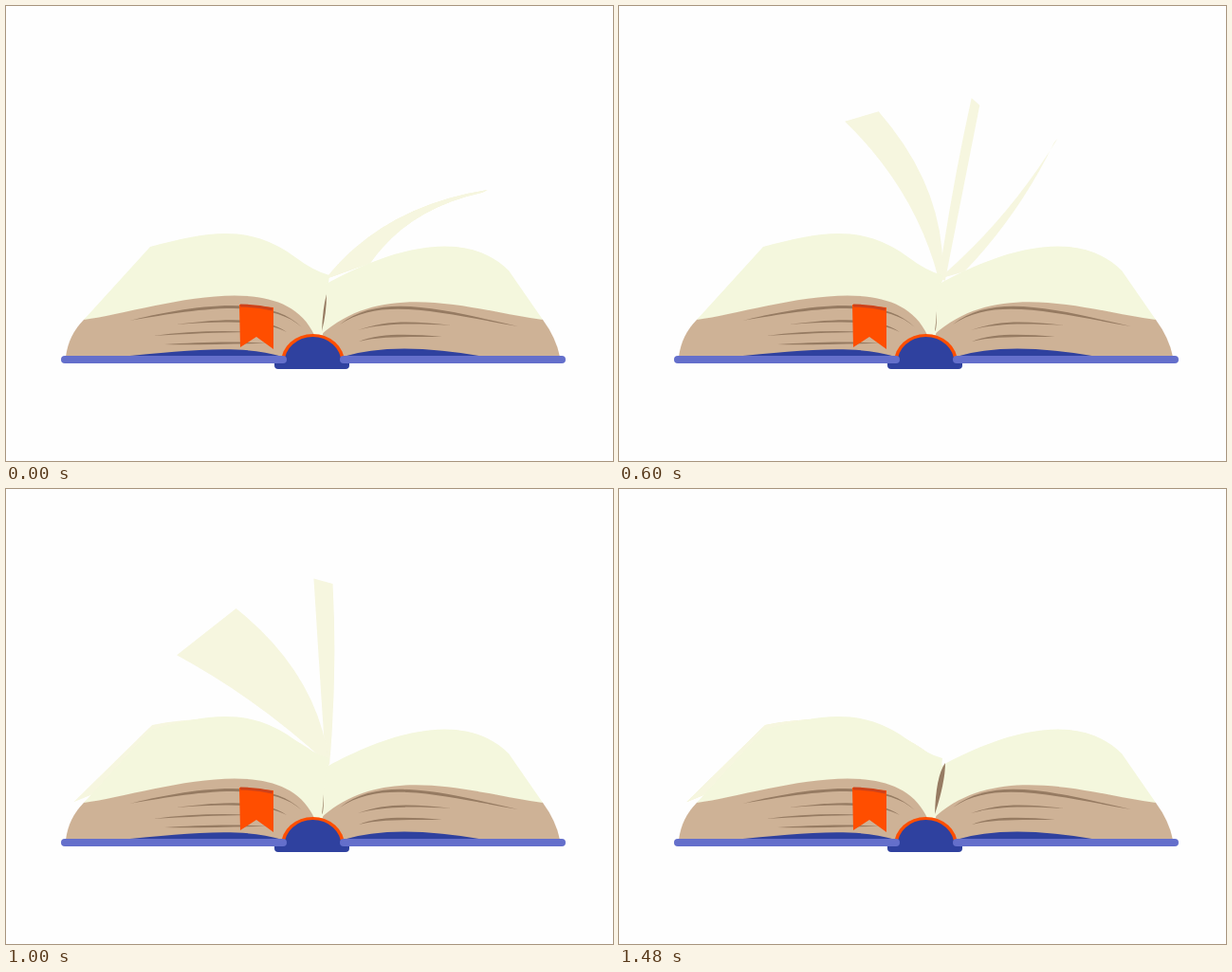
An HTML page that plays this animation: 640x480 px, repeating every 1520 ms.

```html
<!DOCTYPE html>
<html lang="en">
<head>
<meta charset="utf-8">
<title>Book with turning pages</title>
<style>
  html, body { margin: 0; width: 100%; height: 100%; overflow: hidden; background: #fefefe; }
  svg { display: block; width: 100%; height: 100%; }
  .sheet { fill: #f6f6df; }
  .cream { fill: #f4f7dd; }
  .tan { fill: #ceb296; }
  .dark { fill: #2f419f; }
  .cover { fill: #646fcb; }
  .ribbon { fill: #ff4e00; }
  .line { fill: #967b62; }
  .fold { fill: none; stroke: #cd4119; stroke-width: 3; }
</style>
</head>
<body>
<svg viewBox="0 0 640 480">
  <g id="pages" class="sheet"></g>

  <path class="tan" d="M63 370Q66 347 82 331L150 280H300L332 340L324 352L296 371Z"/>
  <path class="tan" d="M584 370Q580 350 566 331L520 290H370L332 340L330 350L352 371Z"/>
  <path class="cream" d="M82 331L152 254C215 237 258 230 305 265Q325 280 341 284L334 347H325C290 270 150 322 82 331Z"/>
  <path class="cream" d="M338 293C380 270 475 225 530 279L566 331C500 323 400 285 332 347Z"/>
  <path id="crease" class="line"/>

  <g class="line">
    <path d="M130 332C180 320 275 300 312 339C275 304 180 324 130 332Z"/>
    <path d="M180 336C220 331 270 326 296 344C270 330 220 333 180 336Z"/>
    <path d="M155 348C190 343 230 342 262 344C230 344 190 346 155 348Z"/>
    <path d="M167 357C200 355 240 353 276 356C240 356 200 358 167 357Z"/>
    <path d="M352 336C395 302 460 320 540 338C460 324 395 306 352 336Z"/>
    <path d="M371 342C400 331 430 332 470 337C430 335 400 334 371 342Z"/>
    <path d="M372 354C395 345 425 346 460 349C425 349 395 348 372 354Z"/>
  </g>
  <path class="ribbon" d="M246 315L282 318V362L264 349L247 360Z"/>
  <path class="fold" d="M247 316Q265 316 281 320"/>

  <path class="dark" d="M118 370C190 364 245 356 292 370ZM355 370Q410 353 505 370Z"/>
  <rect class="dark" x="283" y="373" width="79" height="10" rx="4"/>
  <path class="ribbon" d="M290 376A33.5 30 0 0 1 357 376Z"/>
  <path class="dark" d="M293.5 376A30 27 0 0 1 353.5 376Z"/>
  <rect class="cover" x="58" y="369" width="238" height="8" rx="4"/>
  <rect class="cover" x="352" y="369" width="238" height="8" rx="4"/>
</svg>
<script>
const LOOP = 1520, STEP = 40, RAD = Math.PI / 180;
const LAGS = [520, 240, 0];

// Turn of a page: age in ms, angle of each outer corner and bend in degrees.
const turn = [
  { age: -400, far: 29, near: 29, bend: 23 },
  { age: 0, far: 38, near: 38, bend: 5 },
  { age: 80, far: 50, near: 50, bend: -9 },
  { age: 160, far: 67, near: 61, bend: -19 },
  { age: 360, far: 80, near: 77, bend: 0 },
  { age: 400, far: 80, near: 77, bend: 0 },
  { age: 480, far: 94, near: 88, bend: -4 },
  { age: 600, far: 121, near: 110, bend: -24 },
  { age: 640, far: 128, near: 109, bend: -23 },
  { age: 880, far: 161, near: 132, bend: -25 },
  { age: 940, far: 189, near: 168, bend: -30 }
];

const lerp = (a, b, k) => a + (b - a) * k;

function poseAt(age) {
  const next = turn.findIndex(key => key.age > age);
  if (next < 0) return turn[turn.length - 1];
  const from = turn[next - 1], to = turn[next];
  const mix = name => lerp(from[name], to[name], (age - from.age) / (to.age - from.age));
  return { far: mix("far"), near: mix("near"), bend: mix("bend") };
}

const corner = (angle, reach) =>
  [338 + reach * Math.cos(angle * RAD), 288 - reach * Math.sin(angle * RAD)];

// Control point of a curved edge: half its chord, rotated about the root.
function bow(root, tip, bend) {
  const x = (tip[0] - root[0]) / 2, y = (tip[1] - root[1]) / 2;
  const c = Math.cos(bend * RAD), s = Math.sin(bend * RAD);
  return [root[0] + x * c + y * s, root[1] - x * s + y * c];
}

function pagePath(age) {
  const { far, near, bend } = poseAt(age);
  // The far corner swings toward the viewer as the page comes down.
  const farTip = corner(far, 194 + Math.max(0, far - 150) ** 2 / 20);
  const nearTip = corner(near, 188);
  const slide = 56 * Math.max(0, Math.cos(near * RAD)) ** 2;
  const farRoot = [337, 288], nearRoot = [341 + slide, 291 - slide * 0.46];
  const farBow = bow(farRoot, farTip, bend + 0.7 * (far - near));
  const nearBow = bow(nearRoot, nearTip, bend);
  return `M${farRoot}Q${farBow} ${farTip}L${nearTip}Q${nearBow} ${nearRoot}Z`;
}

// All pages start stacked together and reach their own lag by 240 ms.
const pageAge = (t, lag) => t < 240 ? lerp(-400, 240 - lag, t / 240) : t - lag;

function creasePath(t) {
  const [x, y] = t < 560 ? [338, 304] : t < 1120 ? [335, 322] : [344, 289];
  return `M${x} ${y}Q${x} ${y + 20} 333 343Q334 ${y + 14} ${x} ${y}Z`;
}

const group = document.getElementById("pages");
const crease = document.getElementById("crease");
const sheets = LAGS.map(() =>
  group.appendChild(document.createElementNS("http://www.w3.org/2000/svg", "path")));

function draw() {
  const t = Math.floor(performance.now() % LOOP / STEP) * STEP;
  sheets.forEach((sheet, i) => sheet.setAttribute("d", pagePath(pageAge(t, LAGS[i]))));
  crease.setAttribute("d", creasePath(t));
  requestAnimationFrame(draw);
}
draw();
</script>
</body>
</html>
```
